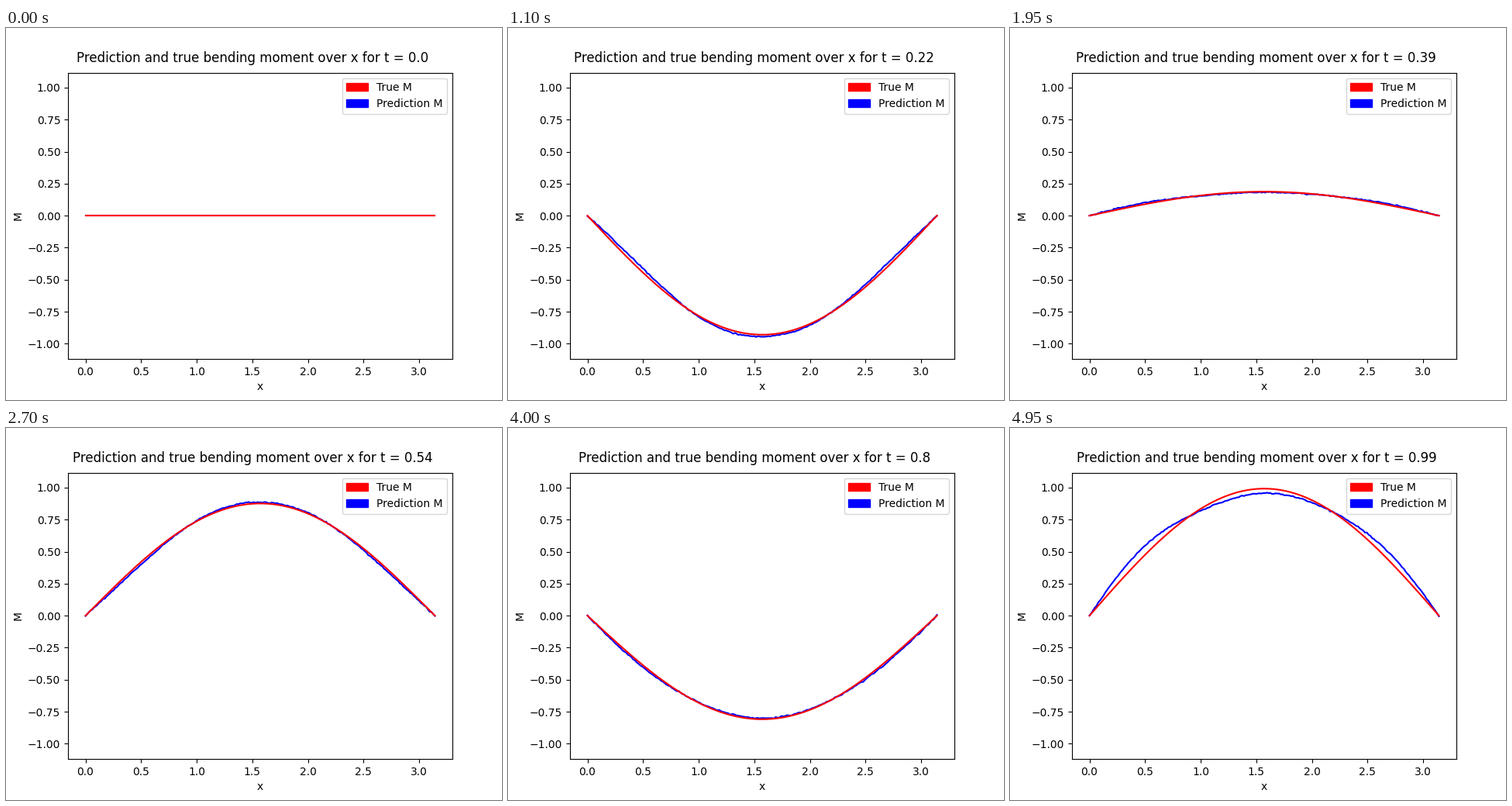
A matplotlib script for the animation above (5000 ms loop, 640x480 px).

```python
import numpy as np
import matplotlib.pyplot as plt
from matplotlib.animation import FuncAnimation
from matplotlib.patches import Patch

plt.rcParams["font.family"] = "DejaVu Sans"

FRAMES = 100
POINTS = 200
x = np.linspace(0, np.pi, POINTS)
flat = np.zeros(POINTS)
error_shape = np.sin(3 * x) + 0.12 * np.sin(4 * x) + 0.35 * np.sin(5 * x)


def true_moment(t):
    return np.cos(4 * np.pi * t) * np.sin(x)


def model_error(t, seed):
    # Slow oscillation that grows sharply near the end of the time range
    size = 0.024 * np.sin(2 * np.pi * t / 0.88) + 0.045 * t**20
    noise = np.random.default_rng(seed).normal(0, 0.0025, POINTS)
    return size * error_shape + noise


fig, ax = plt.subplots(figsize=(6.4, 4.8), dpi=100)
pred_line, = ax.plot(x, flat, color="blue")
true_line, = ax.plot(x, flat, color="red")
ax.set_ylim(-1.1202, 1.1171)
ax.set_xlabel("x")
ax.set_ylabel("M")
ax.legend(handles=[Patch(color="red", label="True M"),
                   Patch(color="blue", label="Prediction M")],
          loc="upper right")
title = ax.text(1.5, 1.2, "", ha="center", fontsize=12)


def update(i):
    t = round(i / FRAMES, 2)
    # The loop opens on an empty, flat plot
    true = true_moment(t) if i else flat
    pred = true + model_error(t, i) if i else flat
    true_line.set_ydata(true)
    pred_line.set_ydata(pred)
    title.set_text(f"Prediction and true bending moment over x for t = {t}")
    return pred_line, true_line, title


anim = FuncAnimation(fig, update, frames=FRAMES, interval=50, repeat=True)
plt.show()
```
